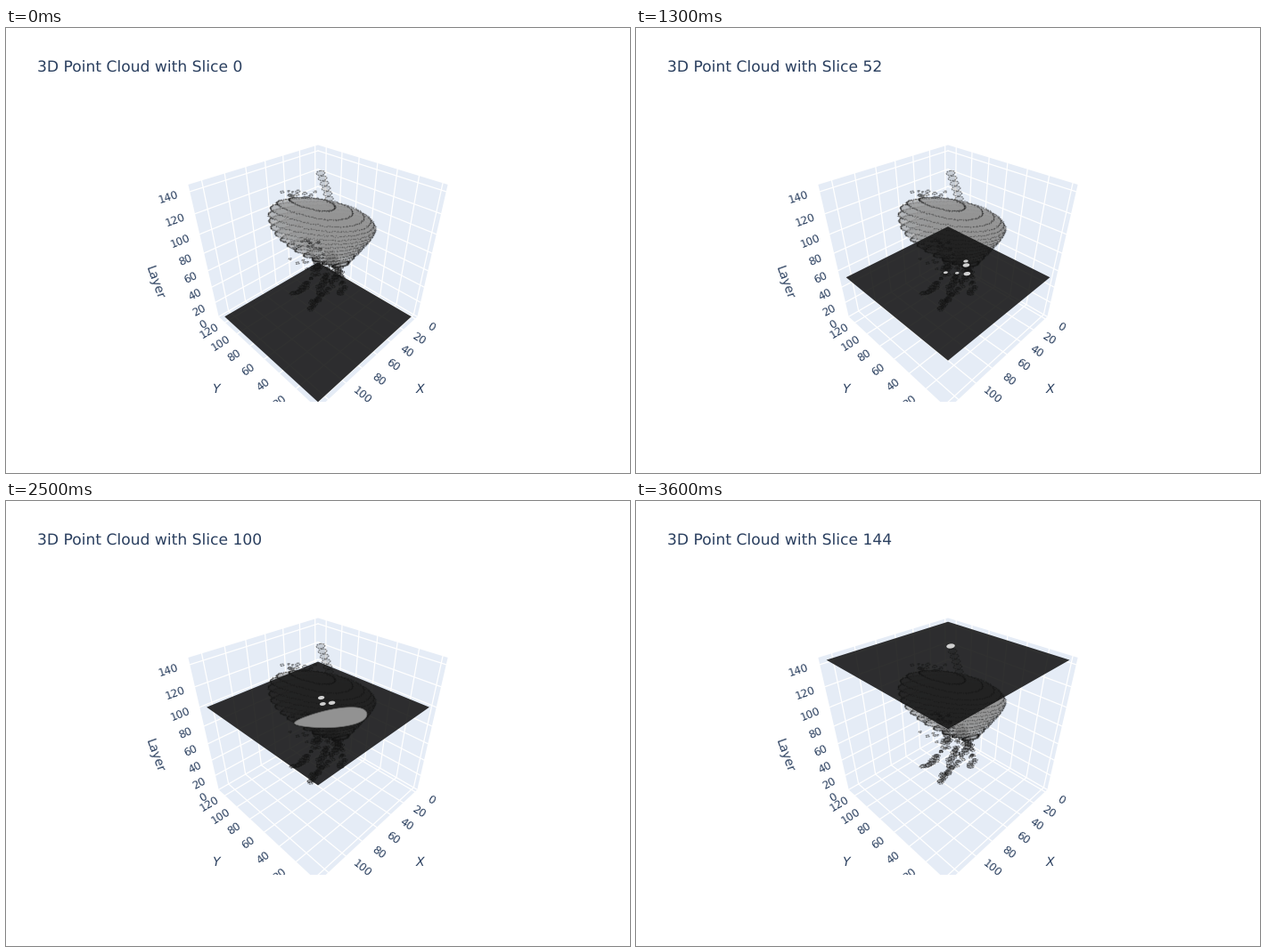
A matplotlib script that plays this animation: 700 by 500 pixels, repeating every 3700 ms.

```python
import numpy as np
import matplotlib.pyplot as plt
from matplotlib.animation import FuncAnimation
from matplotlib.patches import Ellipse, Polygon, Rectangle

W, H, DPI = 700, 500, 100
STEP, FRAMES, INTERVAL = 4, 37, 100
INK, WALL = "#2a3f5f", "#e5ecf6"
FOCAL = 160 / np.tan(np.pi / 8)
EYE = 1.25 * np.sqrt(3)
SPAN, PAD, DEPTH = 127, 1 / 1.0625, 146
PX = 72 / DPI

plt.rcParams.update({"font.family": "DejaVu Sans", "text.hinting": "none"})
rng = np.random.default_rng(7)

fig = plt.figure(figsize=(W / DPI, H / DPI), dpi=DPI, facecolor="white")
ax = fig.add_axes([0, 0, 1, 1])
ax.set(xlim=(0, W), ylim=(H, 0))
ax.axis("off")


def project(x, y, z):
    """Perspective view of the unit cube from its diagonal."""
    d = EYE - (x + y + z) / np.sqrt(3)
    return np.array([350 + FOCAL * (y - x) / np.sqrt(2) / d,
                     260 - FOCAL * (2 * z - x - y) / np.sqrt(6) / d])


def ux(v):
    return PAD * (v / SPAN - 0.5)


def uy(v):
    return -ux(v)


def uz(v):
    return v / DEPTH - 0.5


def quad(*corners):
    return np.array([project(*c) for c in corners])


def line(a, b):
    ax.plot(*zip(project(*a), project(*b)), color="white", lw=1.3 * PX, zorder=1)


def label(text, at, toward, size=12):
    """Text at a projected point, turned along the line to a second point."""
    p, q = project(*at), project(*toward)
    dx, dy = q - p
    angle = (-np.degrees(np.arctan2(dy, dx)) + 90) % 180 - 90
    ax.text(*p, text, color=INK, fontsize=size * PX, rotation=angle,
            ha="center", va="center", zorder=2)


# Walls, grid and labels
h, tick, far = 0.5, 0.62, 0.83
for wall in (quad((-h, -h, -h), (h, -h, -h), (h, h, -h), (-h, h, -h)),
             quad((-h, -h, -h), (-h, h, -h), (-h, h, h), (-h, -h, h)),
             quad((-h, -h, -h), (h, -h, -h), (h, -h, h), (-h, -h, h))):
    ax.add_patch(Polygon(wall, fc=WALL, lw=0, zorder=0))

for v in range(0, 140, 20):
    a, b = ux(v), uy(v)
    line((a, -h, h), (a, -h, -h))
    line((a, -h, -h), (a, h, -h))
    line((-h, b, h), (-h, b, -h))
    line((-h, b, -h), (h, b, -h))
    label(str(v), (a, tick, -h), (a, h, -h))
    label(str(v), (tick, b, -h), (h, b, -h))
for v in range(0, 160, 20):
    c = uz(v)
    line((-h, -h, c), (h, -h, c))
    line((-h, -h, c), (-h, h, c))
    label(str(v), (tick, -h, c), (h, -h, c))

for name, at in (("X", (0, far, -h)), ("Y", (far, 0, -h))):
    ax.text(*project(*at), name, color=INK, fontsize=14 * PX, style="italic",
            ha="center", va="center", zorder=2)
label("Layer", (far, -h, 0), (far, -h, -0.1), 14)
ax.add_patch(Rectangle((0, 420), W, 80, fc="white", lw=0, zorder=9))
title = ax.text(35, 50, "", color=INK, fontsize=17.15 * PX, va="baseline")

# Each vessel: top (z, x, y), bottom (z, x, y), sideways bow in pixels
VESSELS = [
    ((144, 353, 163), (84, 363, 250), 7),
    ((84, 363, 250), (52, 370, 262), 0),
    ((56, 368, 262), (24, 378, 298), 3),
    ((108, 350, 212), (16, 342, 316), 16),
    ((84, 340, 247), (24, 324, 299), 16),
    ((56, 373, 272), (20, 346, 309), 4),
    ((104, 352, 222), (92, 362, 240), 0),
]
LOW, WIDEST, HIGH = 84, 117, 136


def has_section(z):
    return LOW <= z <= HIGH


def section(z):
    """Egg-shaped outline of the organ, which leans and swells with height."""
    t = np.linspace(0, 2 * np.pi, 120, endpoint=False)
    if z < WIDEST:
        swell = 1 - ((WIDEST - z) / 37) ** 1.5
    else:
        swell = 1 - ((z - WIDEST) / 23) ** 3
    a = 59 * swell
    dx = a * np.cos(t) * (1 + 0.02 * np.sin(3 * t + z / 9))
    dy = 0.25 * a * np.sin(t) * (1 + 0.3 * np.cos(t))
    tilt = -0.25 + 0.008 * (z - LOW)
    return np.column_stack([375 - 0.62 * (z - LOW) + dx,
                            265.5 - 1.32 * (z - LOW) + dy + tilt * dx])


def spots(z):
    """Centre and half width of every vessel cut at this level."""
    for n, ((z0, x0, y0), (z1, x1, y1), bow) in enumerate(VESSELS):
        t = (z0 - z) / (z0 - z1)
        if 0 <= t <= 1:
            r = 4.8 if z > 116 else 2.9 + np.sin(z / 5 + 2 * n)
            yield x0 + (x1 - x0) * t + bow * np.sin(np.pi * t), y0 + (y1 - y0) * t, r


def ring(x, y, r, depth, **kw):
    return ax.add_patch(Ellipse((x, y), 2 * r, 1.1 * r, angle=-8, zorder=depth, **kw))


def bit(x, y, r, depth):
    ring(x, y, r, depth, fc=(0.3, 0.3, 0.3, 0.2), ec=(0.1, 0.1, 0.1, 0.5),
         lw=1.2 * PX, ls=(0, (1.6, 0.7)))


# The cloud: stacked outlines from the bottom up
for z in range(0, FRAMES * STEP, STEP):
    depth = 3 + z / 1000
    if has_section(z):
        p = section(z)
        ax.add_patch(Polygon(p, fc=(0.58, 0.58, 0.58, 0.6), lw=0, zorder=depth))
        dots = np.concatenate([p, (p + np.roll(p, -1, 0)) / 2])
        dots += rng.normal(0, 0.4, dots.shape)
        ax.scatter(*dots.T, s=(1.5 * PX) ** 2, c=[(0.12, 0.12, 0.12, 0.28)],
                   lw=0, zorder=depth)
    for x, y, r in spots(z):
        if z > 116:
            bit(x, y, r, depth)
        elif z < LOW:
            for _ in range(3):
                bit(x + rng.normal(0, 1.8), y + rng.normal(0, 1.5), r, depth)

# Loose bits above the left lobe and under the organ
for x, y in zip(rng.uniform(306, 350, 14), rng.uniform(183, 191, 14)):
    bit(x, y, rng.uniform(1.2, 2.6), 3.2)
for x, y in zip(rng.normal(341, 13, 34), rng.uniform(238, 272, 34)):
    bit(x, y, rng.uniform(1, 2.4), 3.2)

plane = ax.add_patch(Polygon(np.zeros((4, 2)), fc=(0.065, 0.065, 0.065, 0.87),
                             lw=0, zorder=5))
lit = []


def update(i):
    z = i * STEP
    title.set_text(f"3D Point Cloud with Slice {z}")
    lo, hi, c = ux(0), ux(SPAN), uz(z)
    plane.set_xy(quad((lo, lo, c), (hi, lo, c), (hi, hi, c), (lo, hi, c)))
    while lit:
        lit.pop().remove()
    if has_section(z):
        lit.append(ax.add_patch(Polygon(section(z), fc="#929292", ec="#6c6c6c",
                                        lw=0.7 * PX, zorder=6)))
    for x, y, r in spots(z):
        lit.append(ring(x, y, r, 7, fc="#d0d0d0", lw=0))
    return [title, plane, *lit]


anim = FuncAnimation(fig, update, frames=FRAMES, interval=INTERVAL,
                     repeat=True, repeat_delay=0, blit=False)
plt.show()
```
